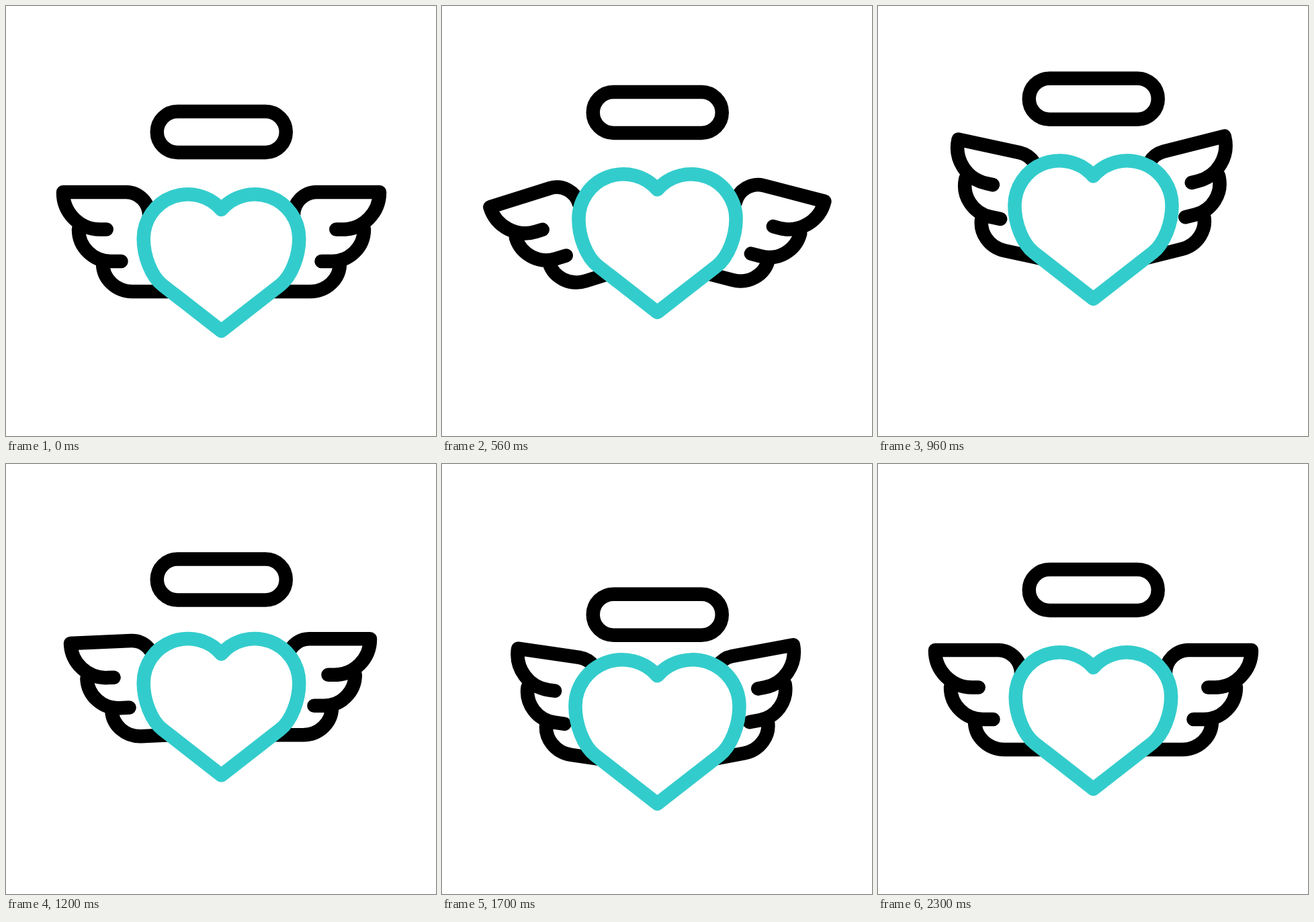
Recreate the animation shown at these times as an HTML page. Size 640 by 640 pixels, loop 2400 ms.

```html
<!DOCTYPE html>
<html>
<head>
<meta charset="utf-8">
<style>
html, body { margin: 0; width: 100%; height: 100%; overflow: hidden; background: #fff; }
svg { display: block; }
path, rect {
  fill: none; stroke: #000; stroke-width: 20.5;
  stroke-linecap: round; stroke-linejoin: round;
  vector-effect: non-scaling-stroke;
}
#heart { fill: #fff; stroke: #33cccc; }
</style>
</head>
<body>
<svg width="640" height="640" viewBox="0 0 640 640">
  <defs>
    <path id="wing" d="M428 312 A34.5 34.5 0 0 1 462 277 H556 A55 55 0 0 1 501 332.5 H491.3
      M533 332.5 A48 47.5 0 0 1 485 380 H469.5
      M497 383 A44 42 0 0 1 453 425 H398"/>
  </defs>
  <g transform="matrix(-1 0 0 1 641 0)"><use href="#wing" id="left"/></g>
  <use href="#wing" id="right"/>
  <path id="heart" d="M320.5 303 A66 66 0 0 0 204.7 346 C204.7 372 216 402.3 233 415.5 L320.5 483.7
    L408 415.5 C425 402.3 436.3 372 436.3 346 A66 66 0 0 0 320.5 303 Z"/>
  <rect id="halo" x="224.75" y="157" width="192" height="61" rx="30.5"/>
</svg>
<script>
const LOOP = 2400, STEP = 20, START = 200, BEAT = 400;
const CX = 505.5, CY = 329.7; // middle of the right wing

const $ = id => document.getElementById(id);
const ease = s => s * s * (3 - 2 * s);
const mix = (a, b, p) => a + (b - a) * p;
const move = (id, value) => $(id).setAttribute('transform', value);

// Rise to the top, sink below the resting place, settle.
function bob(t, top, low, tTop, tLow, tEnd) {
  const leg = (from, to) => ease(Math.min(1, Math.max(0, (t - from) / (to - from))));
  return top * leg(START, tTop) + (low - top) * leg(tTop, tLow) - low * leg(tLow, tEnd);
}

// Two beats, a pause of one beat, two beats.
function heartScale(beats) {
  const n = Math.floor(beats);
  if (n < 0 || n === 2 || n > 4) return 1;
  return 1 + 0.108 * ease(1 - Math.abs(2 * (beats - n) - 1));
}

// A pose as a matrix column (a, b) and a shift of the wing's middle.
function pose(degrees, x, y) {
  const r = degrees * Math.PI / 180;
  return [Math.cos(r), Math.sin(r), x, y];
}
const REST = pose(0, 0, 0);
const wings = {
  right: { down: pose(15, 1.9, 29), up: pose(-15, -26.5, -25.5) },
  left: { down: pose(18, 0.2, 34.5), up: pose(-13, -22.8, -22) }
};

// Down, up, down, up, back to rest; outlines blend linearly between poses.
function placeWing(id, beats, y) {
  const { down, up } = wings[id];
  const poseAt = i => i < 1 || i > 4 ? REST : i % 2 ? down : up;
  const n = Math.floor(beats), next = poseAt(n + 1);
  const [a, b, dx, dy] = poseAt(n).map((v, i) => mix(v, next[i], ease(beats - n)));
  const e = CX + dx - a * CX + b * CY, f = CY + dy + y - b * CX - a * CY;
  move(id, `matrix(${a} ${b} ${-b} ${a} ${e} ${f})`);
}

function draw(t) {
  const beats = Math.max(0, t - START) / BEAT;
  const y = bob(t, -52, 18, 870, 1575, 2260);
  placeWing('left', beats, y);
  placeWing('right', beats, y);
  move('heart', `translate(320.5 ${381.75 + y}) scale(${heartScale(beats)}) translate(-320.5 -381.75)`);
  move('halo', `translate(0 ${bob(t, -52.7, 38.3, 875, 1615, 2300)})`);
}

const start = performance.now();
function tick() {
  const t = (performance.now() - start) % LOOP;
  draw(Math.floor(t / STEP) * STEP);
  requestAnimationFrame(tick);
}
tick();
</script>
</body>
</html>
```
